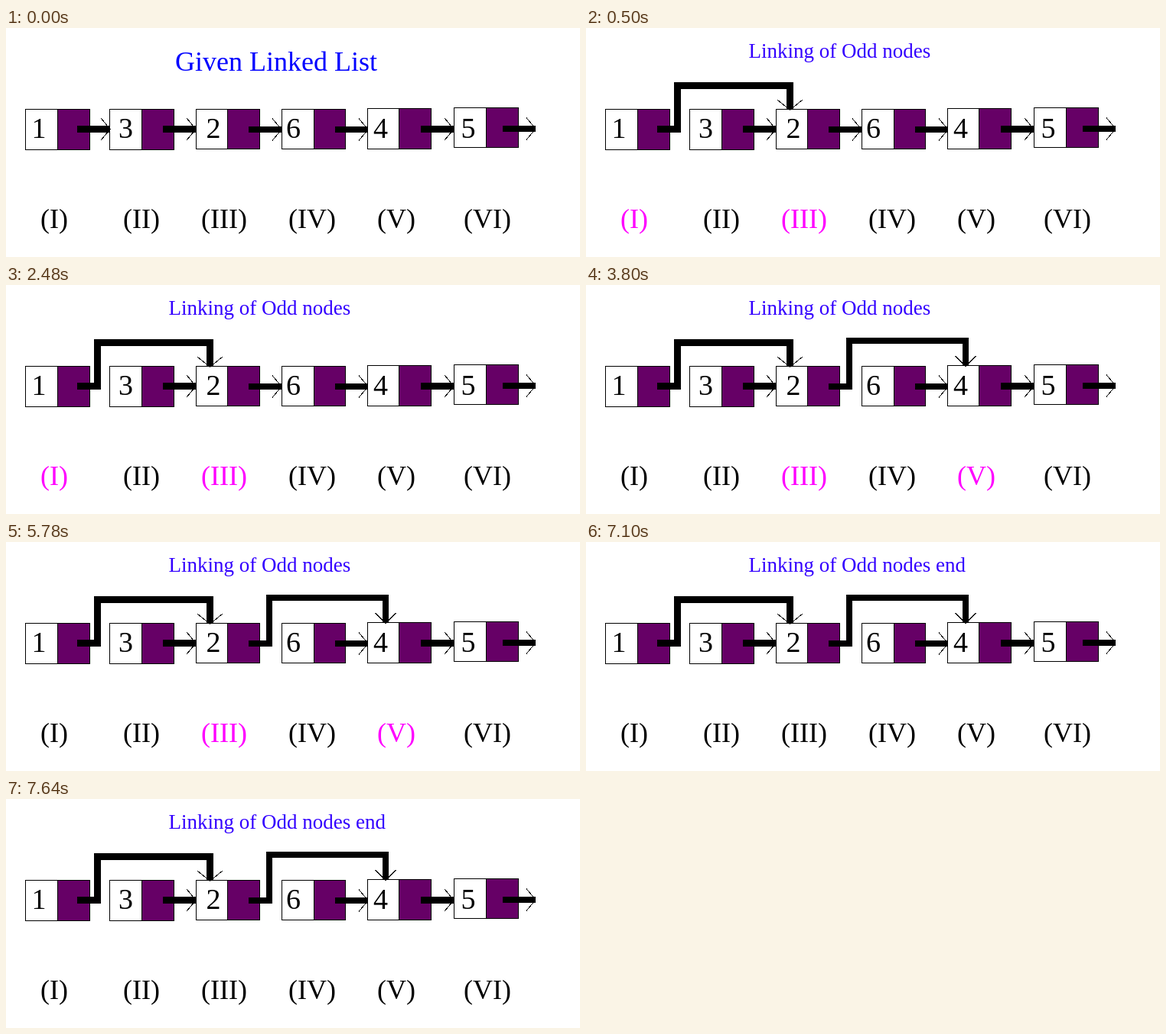
An HTML page that plays this animation: 750x300 px, repeating every 8 s.

```html
<!DOCTYPE html>
<html lang="en">
<head>
<meta charset="utf-8">
<title>Linking odd nodes</title>
<style>
  html, body { margin: 0; width: 100%; height: 100%; overflow: hidden; background: #fff; }
  svg { display: block; font: 36px "Liberation Serif", "Times New Roman", serif; }
  rect, path { stroke: #000; }
  path { fill: none; shape-rendering: crispEdges; }
  .box { fill: #fff; }
  .pointer { fill: #606; }
</style>
</head>
<body>
<svg id="stage" width="750" height="300" viewBox="0 0 750 300"></svg>
<script>
const LOOP = 8000;
const stage = document.getElementById('stage');

// box edges, digit and label positions, then start, centre line and weight of the arrow
const nodes = [
  { x: 25, split: 67, right: 109, y: 106, h: 53, value: 1, valueX: 33.5, label: '(I)', labelX: 45, from: 93, mid: 132.5, weight: 9 },
  { x: 135, split: 177, right: 219, y: 106, h: 53, value: 3, valueX: 147, label: '(II)', labelX: 153, from: 205, mid: 132.5, weight: 9 },
  { x: 248, split: 289, right: 331, y: 106, h: 52, value: 2, valueX: 261.5, label: '(III)', labelX: 255, from: 317, mid: 133, weight: 8 },
  { x: 360, split: 402, right: 443, y: 106, h: 52, value: 6, valueX: 366, label: '(IV)', labelX: 369, from: 430, mid: 133, weight: 8 },
  { x: 472, split: 513, right: 555, y: 105, h: 53, value: 4, valueX: 480, label: '(V)', labelX: 485, from: 542, mid: 132.5, weight: 9 },
  { x: 585, split: 627, right: 669, y: 104, h: 52, value: 5, valueX: 594.5, label: '(VI)', labelX: 598, from: 649, mid: 132, weight: 8 }
];

// routes of the arrows that skip a neighbour, by index of their node
const bends = {
  0: { left: 119.5, top: 75.5, right: 266.5, end: 106, spread: 16.5 },
  2: { left: 344, top: 73, right: 496, end: 105, spread: 13.5 }
};

const steps = [
  { start: 0, title: 'Given Linked List', x: 221, y: 56, size: 36, color: '#00f', bent: [], marked: [] },
  { start: 500, title: 'Linking of Odd nodes', bent: [0], marked: [0, 2] },
  { start: 3800, title: 'Linking of Odd nodes', bent: [0, 2], marked: [2, 4] },
  { start: 7100, title: 'Linking of Odd nodes end', bent: [0, 2], marked: [] }
];

const text = (content, x, y, color = '#000', size = 36) =>
  `<text x="${x}" y="${y}" fill="${color}" font-size="${size}">${content}</text>`;

const path = (d, weight = 1) => `<path d="${d}" stroke-width="${weight}"/>`;

const rect = (kind, left, right, y, h) =>
  `<rect class="${kind}" x="${left + .5}" y="${y + .5}" width="${right - left}" height="${h}"/>`;

const drawNode = ({ x, split, right, y, h, value, valueX }) =>
  rect('box', x, right, y, h) + rect('pointer', split, right, y, h) + text(value, valueX, 144, '#000', 38);

function straightArrow({ from, mid, weight }) {
  const tip = from + 43;
  return path(`M${from} ${mid}H${tip}`, weight) +
    path(`M${tip - 12} ${mid - 14.5}L${tip} ${mid}L${tip - 12} ${mid + 14.5}`);
}

function bentArrow({ from, mid, weight }, { left, top, right, end, spread }) {
  return path(`M${from} ${mid}H${left}V${top}H${right}V${end}`, weight) +
    path(`M${right - spread} ${end - 12}L${right} ${end + 1.5}L${right + spread} ${end - 12}`);
}

function draw({ title, x = 212.5, y = 39, size = 27, color = '#30f', bent, marked }) {
  stage.innerHTML = text(title, x, y, color, size) +
    nodes.map(drawNode).join('') +
    nodes.map((node, i) => bent.includes(i) ? bentArrow(node, bends[i]) : straightArrow(node)).join('') +
    nodes.map((node, i) => text(node.label, node.labelX, 262, marked.includes(i) ? '#f0f' : '#000')).join('');
}

let shown;
function tick() {
  const time = performance.now() % LOOP;
  const step = steps.findLast(({ start }) => start <= time);
  if (step !== shown) draw(shown = step);
  requestAnimationFrame(tick);
}
tick();
</script>
</body>
</html>
```
